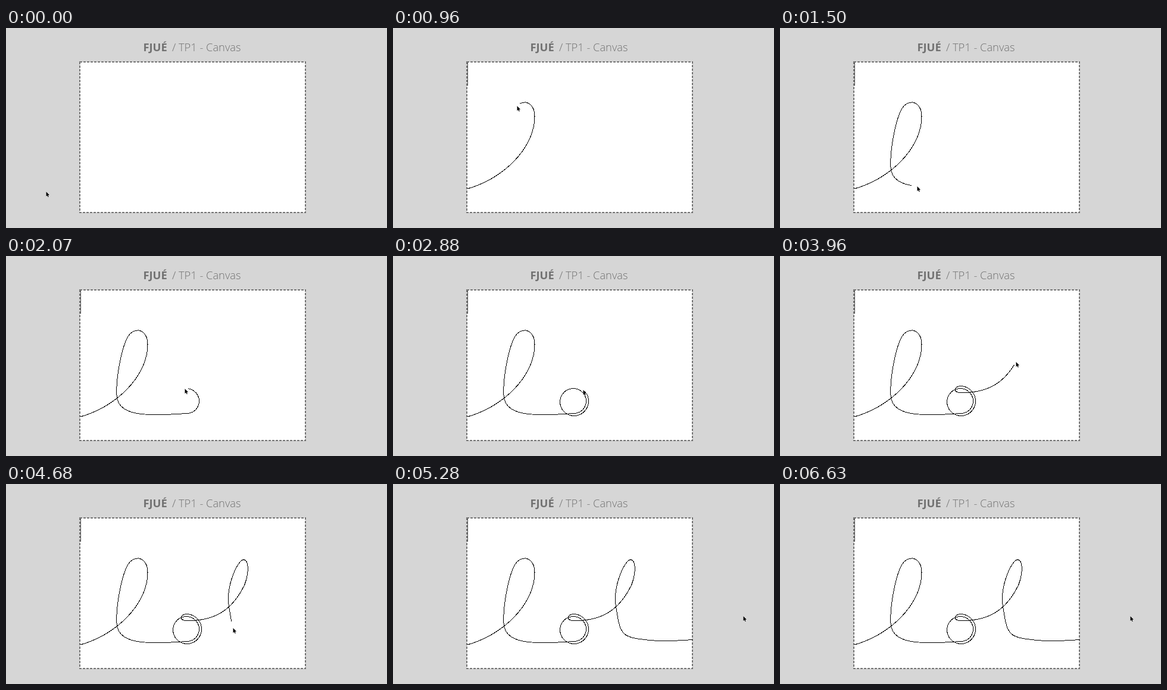
Recreate the animation shown at these times as an HTML page. Size 640 px wide and 336 px high, loop 6720 ms.

```html
<!DOCTYPE html>
<html lang="fr">
<head>
<meta charset="utf-8">
<title>TP1 - Canvas</title>
<style>
  html, body { margin: 0; width: 100%; height: 100%; overflow: hidden; background: #d6d6d6; }
  svg { display: block; width: 640px; height: 336px; }
  text { font: 350 18.3px "Open Sans", "Noto Sans", sans-serif; fill: #717171; }
  .bold { font-weight: 700; }
  .frame { fill: #fff; stroke: #757575; stroke-width: 2; stroke-dasharray: 4 2; }
  .ink { fill: none; stroke: #000; stroke-linejoin: round; }
  #trail { shape-rendering: crispEdges; }
  #cursor { fill: #000; stroke: #fff; stroke-width: 1; paint-order: stroke; }
</style>
</head>
<body>
<svg viewBox="0 0 640 336">
  <clipPath id="sheet"><rect x="125" y="58" width="378" height="251"/></clipPath>
  <text y="39"><tspan class="bold" x="230.5">FJUÉ</tspan><tspan x="279">/ TP1 - Canvas</tspan></text>
  <rect class="frame" x="124" y="57" width="379" height="253"/>
  <g class="ink" clip-path="url(#sheet)">
    <path id="edge" d="M125.2 58V97"/>
    <polyline id="trail" transform="translate(.5 .5)"/>
  </g>
  <path id="cursor" d="M0 0V8L1.8 6.4L3.1 9.3L4.3 8.8L3.1 5.9L5.5 5.7Z"/>
</svg>
<script>
  const LOOP = 6720, STEP = 30;

  // A stroke is a function of its own progress u (0 to 1) and ends at a given time.
  const strokes = [];
  let pen = [67, 274], clock = 0;

  function stroke(end, at) {
    strokes.push({ start: clock, end, at });
    pen = at(1);
    clock = end;
  }

  function curve(end, b, c, d) {
    const a = pen;
    stroke(end, u => {
      const v = 1 - u;
      return a.map((p, i) => v * v * v * p + 3 * v * v * u * b[i] + 3 * v * u * u * c[i] + u * u * u * d[i]);
    });
  }

  // Anticlockwise turns from the bottom, widening and slowing a little.
  function spiral(end, [cx, cy], r0, r1, turns) {
    stroke(end, u => {
      const e = u * (1.25 - u / 4), r = r0 + (r1 - r0) * e, angle = e * turns * 2 * Math.PI;
      return [cx + r * Math.sin(angle), cy + r * Math.cos(angle)];
    });
  }

  // first l
  curve(690, [150, 285], [238, 215], [237.5, 148]);
  curve(960, [238, 128], [222, 117], [208, 130]);
  curve(1280, [194, 143], [182, 215], [186, 238]);
  curve(1680, [192, 270], [240, 268], [303, 264]);
  // o
  spiral(3000, [303, 244], 20, 26, 1.5);
  curve(3320, [292, 218], [290, 229], [302, 229]);
  // second l
  curve(3960, [345, 230], [375, 215], [396, 177]);
  curve(4170, [407, 160], [410, 127], [399, 126.5]);
  curve(4600, [389, 126], [368, 172], [374, 205]);
  curve(4850, [382, 258], [382, 257], [441, 263]);
  curve(5280, [500, 263], [560, 262], [588, 221]);

  function pointAt(t) {
    const s = strokes.find(s => t <= s.end);
    return s.at((t - s.start) / (s.end - s.start));
  }

  const path = Array.from({ length: clock / STEP + 1 }, (_, i) => pointAt(i * STEP));
  const entry = path.findIndex(p => p[0] >= 125);
  const [edge, trail, cursor] = ["edge", "trail", "cursor"].map(id => document.getElementById(id));
  let shown = -1;

  function draw() {
    const step = Math.min(path.length, Math.floor(performance.now() % LOOP / STEP));
    if (step !== shown) {
      shown = step;
      const [x, y] = path[Math.min(step, path.length - 1)];
      cursor.setAttribute("transform", `translate(${Math.round(x) + 0.5} ${Math.round(y) + 1})`);
      // The ink stays one step behind the pointer.
      trail.setAttribute("points", path.slice(0, step).join(" "));
      edge.style.display = step >= entry ? "" : "none";
    }
    requestAnimationFrame(draw);
  }
  draw();
</script>
</body>
</html>
```
